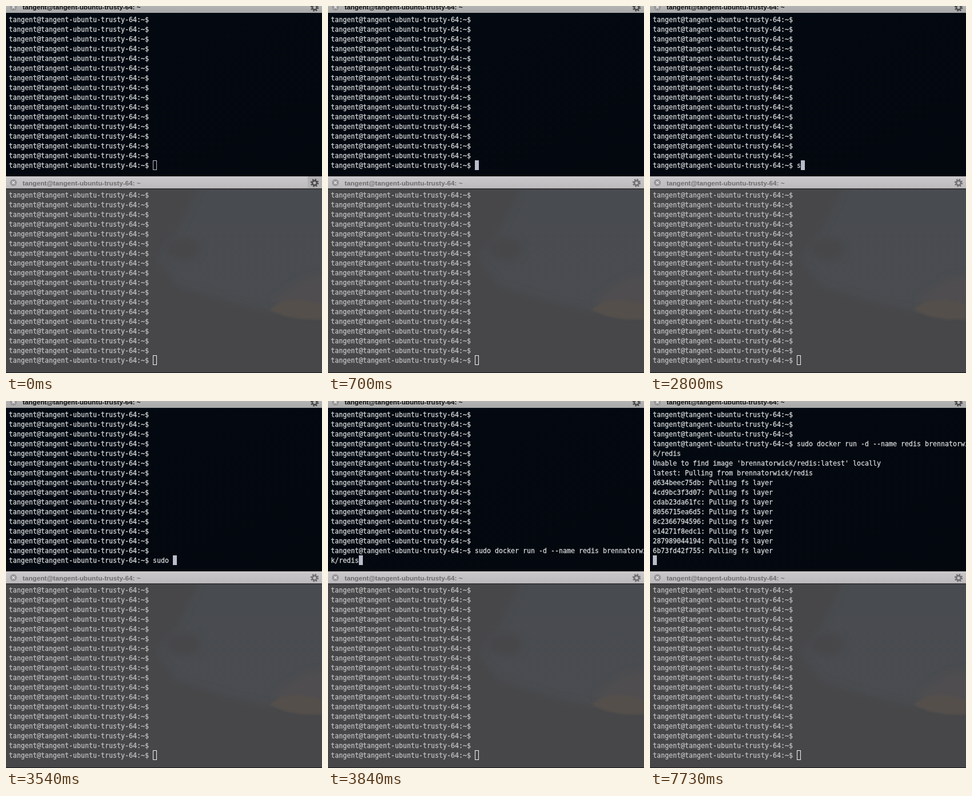
Animation, 553 px wide and 642 px high, one loop 8000 ms. Source, as an HTML page:

```html
<!DOCTYPE html>
<html lang="en">
<head>
<meta charset="utf-8">
<title>Two terminal panes</title>
<style>
  html, body { margin: 0; width: 100%; height: 100%; overflow: hidden; background: #03080f; }
  svg { display: block; width: 553px; height: 642px; }
  .row { font: 11.63px "DejaVu Sans Mono", monospace; white-space: pre; stroke-width: .3; }
  .title { font: bold 11.7px "Liberation Sans", Arial, sans-serif; }
  #top { fill: #d3d7d8; stroke: #d3d7d8; }
  #bottom { fill: #bfbfc0; stroke: #bfbfc0; }
</style>
</head>
<body>
<svg viewBox="0 0 553 642">
  <defs>
    <linearGradient id="night" x2="1" y2="1">
      <stop offset="0" stop-color="#040a12"/>
      <stop offset="1" stop-color="#03070e"/>
    </linearGradient>
    <linearGradient id="silver" x2="0" y2="1">
      <stop offset="0" stop-color="#cbc8cb"/>
      <stop offset="1" stop-color="#bcbabc"/>
    </linearGradient>
    <linearGradient id="steel" x2="0" y2="1">
      <stop offset="0" stop-color="#b4b4b4"/>
      <stop offset="1" stop-color="#a9a9a9"/>
    </linearGradient>
    <linearGradient id="dusk" x2="0" y2="1">
      <stop offset="0" stop-color="#484b4f"/>
      <stop offset="1" stop-color="#4a4c50"/>
    </linearGradient>
    <filter id="soft" x="-20%" y="-20%" width="140%" height="140%"><feGaussianBlur stdDeviation="7"/></filter>
    <filter id="haze" x="-20%" y="-50%" width="140%" height="200%"><feGaussianBlur stdDeviation="2"/></filter>
    <clipPath id="lower"><rect y="320" width="553" height="322"/></clipPath>
    <g id="close">
      <circle cx="13" cy="309" r="6" fill="#979697"/>
      <path d="M10.7 306.7l4.6 4.6m0-4.6l-4.6 4.6" stroke="#e6e4e6" stroke-width="1.6"/>
    </g>
    <g id="gear" fill="none">
      <circle cx="540" cy="309.5" r="3.9" stroke-width="2.6"/>
      <circle cx="540" cy="309.5" r="6" stroke-width="2.4" stroke-dasharray="2.356"/>
    </g>
  </defs>

  <rect width="553" height="298" fill="url(#night)"/>
  <rect width="553" height="12" fill="url(#steel)"/>
  <use href="#close" y="-307"/>
  <use href="#gear" y="-307" stroke="#4b4b4b"/>
  <text class="title" x="29" y="6" fill="#0c0c0c"></text>

  <g clip-path="url(#lower)">
    <rect y="320" width="553" height="322" fill="url(#dusk)"/>
    <path filter="url(#soft)" fill="#47474a" d="M-20 300H345L322 350 300 395 262 440 300 490 400 520 470 535 570 548V670H-20Z"/>
    <ellipse filter="url(#soft)" cx="310" cy="425" rx="30" ry="20" fill="#47474a"/>
    <path filter="url(#soft)" fill="#4f4e4f" d="M470 512L520 478 570 468V540L480 530Z"/>
    <path filter="url(#haze)" fill="#544f4c" d="M460 531L482 518 515 514 553 522V548L520 548 490 543Z"/>
  </g>
  <rect y="298" width="553" height="21" fill="url(#silver)"/>
  <rect y="319" width="553" height="2" fill="#363638"/>
  <rect y="641" width="553" height="1" fill="#15171c"/>
  <rect id="press" x="528" y="298" width="25" height="21" fill="#b3b1b3"/>
  <use href="#close"/>
  <use id="cog" href="#gear"/>
  <text class="title" x="29" y="313.5" fill="#6d6c6d"></text>

  <g id="top"></g>
  <g id="bottom"></g>
  <rect id="caret" height="17"/>
  <rect x="257.5" y="611.5" width="6" height="16" fill="none" stroke="#f2f2f2"/>
</svg>
<script>
const LOOP = 8000, COLS = 80, CELL = 7, LINE = 17, LEFT = 5;
const host = "tangent@tangent-ubuntu-trusty-64:";
const prompt = host + "~$ ";
const image = "brennatorwick/redis";
const command = "sudo docker run -d --name redis " + image;
const missing = `\nUnable to find image '${image}:latest' locally\n`;
const layers = ["d634beec75db", "4cd9bc3f3d07", "cdab23da61fc", "8056715ea6d5",
  "8c2366794596", "e14271f8edc1", "287989044194", "6b73fd42f755"];
const pulls = `latest: Pulling from ${image}\n` +
  layers.map(id => id + ": Pulling fs layer\n").join("");

// [start in ms, text after the last prompt]
const steps = [
  [0, ""],
  [2800, "s"],
  [2950, "su"],
  [3090, "sud"],
  [3240, "sudo"],
  [3540, "sudo "],
  [3840, command],
  [5780, command + missing],
  [7730, command + missing + pulls]
];
const FOCUS = 700;

const $ = id => document.getElementById(id);
const set = (el, attrs) => {
  for (const key in attrs) el.setAttribute(key, attrs[key]);
  return el;
};

function makeRows(parent, count, top) {
  return Array.from({ length: count }, (_, i) => {
    const row = document.createElementNS("http://www.w3.org/2000/svg", "text");
    set(row, { class: "row", x: LEFT, y: top + i * LINE + 13 });
    row.textContent = prompt;
    return parent.appendChild(row);
  });
}

function wrap(text) {
  return text.split("\n").flatMap(line => line.match(new RegExp(`.{1,${COLS}}`, "g")) || [""]);
}

document.querySelectorAll(".title").forEach(el => el.textContent = host + " ~");
const rows = makeRows($("top"), 16, 15);
makeRows($("bottom"), 18, 322);

function draw(t) {
  const typed = steps.filter(s => s[0] <= t).pop()[1];
  const lines = [...Array(15).fill(prompt), ...wrap(prompt + typed)].slice(-16);
  rows.forEach((row, i) => {
    if (row.textContent !== lines[i]) row.textContent = lines[i];
  });

  const active = t >= FOCUS;
  const x = LEFT + lines[15].length * CELL;
  set($("caret"), active
    ? { x, y: 270, width: 7, height: 17, fill: "#b9bdca", stroke: "none" }
    : { x: x + .5, y: 270.5, width: 6, height: 16, fill: "none", stroke: "#b9bdca" });
  set($("press"), { visibility: active ? "hidden" : "visible" });
  set($("cog"), { stroke: active ? "#706f70" : "#4a4a4b" });
}

const start = performance.now();
function frame(now) {
  draw(Math.max(0, now - start) % LOOP);
  requestAnimationFrame(frame);
}
draw(0);
requestAnimationFrame(frame);
</script>
</body>
</html>
```
